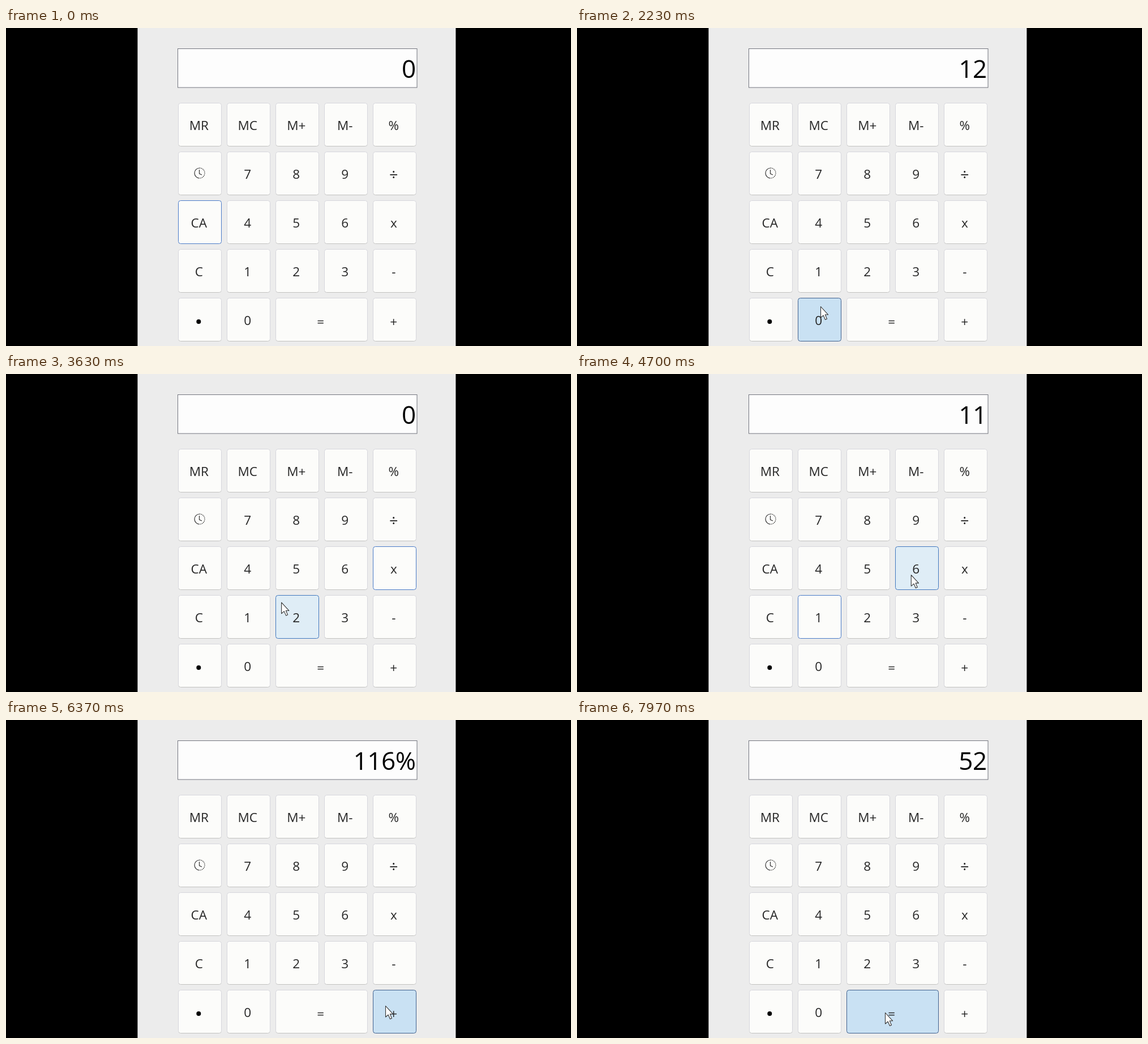
An HTML page for the animation above (8 s loop, 998x561 px).

```html
<!DOCTYPE html>
<html lang="en">
<head>
<meta charset="utf-8">
<title>Calculator</title>
<style>
  html, body { margin: 0; width: 100%; height: 100%; overflow: hidden; background: #000; }
  svg { display: block; width: 100%; height: 100%; }
  text { font-family: "Open Sans", "Noto Sans", sans-serif; fill: #262626; text-anchor: middle; }
  #out { font-size: 44px; letter-spacing: -0.4px; text-anchor: end; fill: #000; }
  .key rect { fill: #fcfcfa; stroke: url(#edge); }
  .key.focus rect { stroke: #4a7bc8; }
  .key.hover rect { fill: #dfedf6; stroke: #4178be; }
  .key.down rect { fill: #c9e1f3; stroke: #40618f; }
</style>
</head>
<body>
<svg viewBox="0 0 998 561">
  <linearGradient id="edge" x2="0" y2="1">
    <stop offset=".95" stop-color="#d6d6dc"/>
    <stop offset="1" stop-color="#c2c2c0"/>
  </linearGradient>
  <rect width="998" height="561" fill="#000"/>
  <rect x="232.4" width="562" height="561" fill="#ececec"/>
  <rect x="303.5" y="36.5" width="422.5" height="68.5" fill="#fdfdfd" stroke="#73757f"/>
  <text id="out" x="723.7" y="88">0</text>
  <g id="keys"></g>
  <g fill="none" stroke="#333" stroke-width="1.2">
    <path d="M342 247A9 9 0 0 0 342 265"/>
    <path d="M342 247A9 9 0 0 1 342 265" stroke-dasharray="1.6 1.2"/>
    <path d="M341.5 250V257L346 259"/>
  </g>
  <path id="cursor" d="M0 0V19.5L4.7 15.5L8 23L11 21.7L7.8 14.3H13.2Z" fill="#fff" stroke="#333" stroke-width="1.1" stroke-linejoin="round"/>
</svg>
<script>
const LOOP = 8000, PITCH = 86, SIZE = 76, LEFT = 304.5, TOP = 132.5;
const HOLD = 90;      // how long a key stays pressed
const LEAD = 140;     // pointer arrives this long before a press
const TRAVEL = 550;   // longest pointer move
const rows = ["MR MC M+ M- %", "clock 7 8 9 ÷", "CA 4 5 6 x", "C 1 2 3 -", "• 0 = = +"];

// time, key, offset of the pointer tip from the key's centre
const presses = [
  [1030, "1"], [1460, "2"], [2190, "0", 2, -23], [2920, "x"],
  [3940, "1"], [4170, "1"], [4850, "6", -10, 12], [5480, "%"],
  [6320, "+", -16, -10], [6860, "5"], [7290, "2"], [7900, "=", -13, 2]
];

const $ = id => document.getElementById(id);
const NS = "http://www.w3.org/2000/svg";
function add(parent, tag, attrs) {
  const el = document.createElementNS(NS, tag);
  for (const k in attrs) el.setAttribute(k, attrs[k]);
  return parent.appendChild(el);
}

const keys = {};
rows.forEach((row, r) => row.split(" ").forEach((label, c) => {
  if (keys[label]) return;
  const w = label === "=" ? SIZE + PITCH : SIZE, x = LEFT + c * PITCH, y = TOP + r * PITCH;
  const el = add($("keys"), "g", { class: "key" });
  add(el, "rect", { x, y, width: w, height: SIZE, rx: 4 });
  if (label === "•") {
    add(el, "circle", { cx: x + 35.8, cy: y + 41.5, r: 4, fill: "#000" });
  } else if (label !== "clock") {
    const size = label === "÷" ? 27 : 22.5, shift = "÷+=".includes(label) ? 2 : 0;
    add(el, "text", { x: x + w / 2 - 1.7, y: y + 47.5 + shift, "font-size": size }).textContent = label;
  }
  keys[label] = { el, x, y, w };
}));

function tip([, key, dx = 0, dy = -6]) {
  const { x, y, w } = keys[key];
  return [x + w / 2 + dx, y + SIZE / 2 + dy];
}

function pointer(t) {
  const next = presses.findIndex(p => p[0] > t);
  if (next <= 0) return tip(presses[next < 0 ? presses.length - 1 : 0]);
  const from = presses[next - 1], to = presses[next];
  const end = to[0] - LEAD, start = Math.max(from[0] + HOLD + 30, end - TRAVEL);
  const u = end > start ? Math.min(1, Math.max(0, (t - start) / (end - start))) : 1;
  const e = u * u * (3 - 2 * u), a = tip(from), b = tip(to);
  return a.map((v, i) => v + (b[i] - v) * e);
}

function enter(shown, key) {
  if (key === "=") return shown;
  if (key === "%") return shown + key;
  if (key === "x" || key === "+") return "0";
  return shown === "0" ? key : shown + key;
}

function draw(t) {
  const [px, py] = pointer(t), first = presses[0][0];
  let shown = "0", focus = "CA", down = null;
  for (const [start, key] of presses) {
    if (t < start) break;
    focus = key;
    if (t < start + HOLD) down = key;
    else shown = enter(shown, key);
  }
  for (const label in keys) {
    const { el, x, y, w } = keys[label];
    const over = t > first - 300 && px >= x && px <= x + w && py >= y && py <= y + SIZE;
    const state = label === down ? " down" : over ? " hover" : label === focus ? " focus" : "";
    el.setAttribute("class", "key" + state);
  }
  $("out").textContent = shown;
  $("cursor").setAttribute("transform", `translate(${px} ${py})`);
  $("cursor").setAttribute("visibility", t < first + HOLD ? "hidden" : "visible");
}

const begin = performance.now();
function tick() {
  draw((performance.now() - begin) % LOOP);
  requestAnimationFrame(tick);
}
tick();
</script>
</body>
</html>
```
